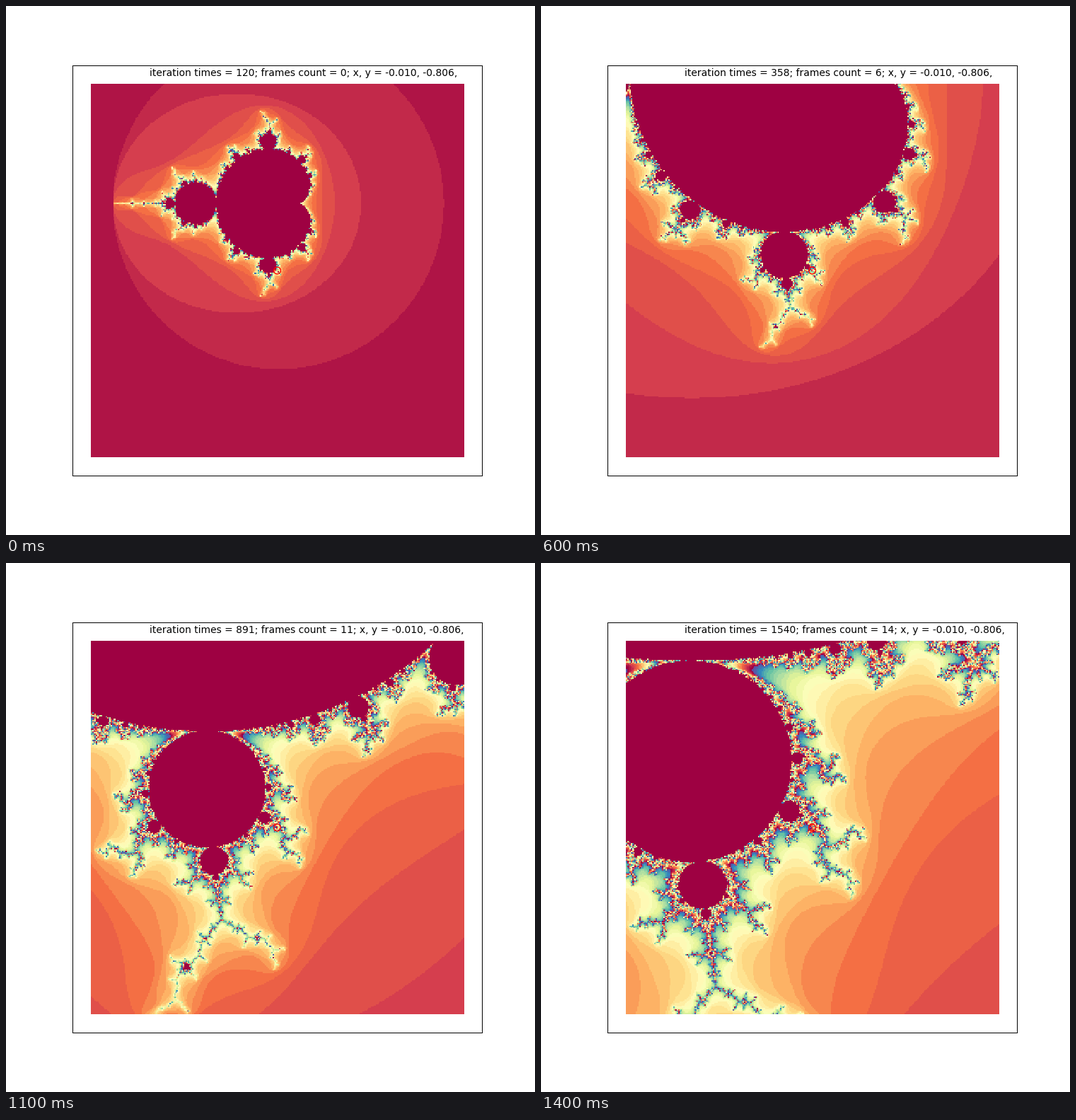
A matplotlib script that plays this animation: 748x748 px, repeating every 1500 ms.

```python
import numpy as np
import matplotlib.pyplot as plt
from matplotlib.animation import FuncAnimation

STAGE = 748
SIZE = 300            # samples per side
HALF = 2.25           # half width of the first view in the complex plane
ZOOM = 1.2
CX, CY = -0.010, -0.806
FRAMES = 15
CYCLE = 30            # colours repeat after this many iterations
CHECK = 60            # steps between tests for settled orbits


def escape_counts(c, limit):
    """Steps until |z| > 2 for each point, 0 where it never escapes."""
    counts = np.zeros(c.size, dtype=int)
    index = np.arange(c.size)
    c = c.ravel()
    z = np.zeros_like(c)
    saved = z.copy()
    for n in range(1, limit):
        z = z * z + c
        out = z.real ** 2 + z.imag ** 2 > 4
        drop = out
        if n % CHECK == 0:
            drop = out | (np.abs(z - saved) < 1e-11)
            saved = z.copy()
        if drop.any():
            counts[index[out]] = n
            keep = ~drop
            c, z, saved, index = c[keep], z[keep], saved[keep], index[keep]
            if not index.size:
                break
    return counts.reshape(SIZE, SIZE)


def iterations(n):
    return int(120 * ZOOM ** n)


def view(n):
    offset = np.linspace(-HALF, HALF, SIZE) / ZOOM ** n
    c = (CX + offset)[None, :] + 1j * (CY - offset)[:, None]
    return escape_counts(c, iterations(n)) % CYCLE


def caption(n):
    return (f"iteration times = {iterations(n)}; frames count = {n}; "
            f"x, y = {CX:.3f}, {CY:.3f},")


def pixel_axes(x, y, side):
    """Square axes with pixel coordinates measured from the stage's top left."""
    ax = fig.add_axes([x / STAGE, 1 - (y + side) / STAGE,
                       side / STAGE, side / STAGE])
    ax.set(xlim=(x, x + side), ylim=(y + side, y), xticks=[], yticks=[])
    return ax


fig = plt.figure(figsize=(STAGE / 100, STAGE / 100), dpi=100,
                 facecolor="white")
frame = pixel_axes(93.5, 84.15, 579.7)
for spine in frame.spines.values():
    spine.set_linewidth(0.72)
label = frame.text(203.2, 99.4, "", fontsize=10, family="DejaVu Sans")

plot = pixel_axes(120, 110, 528)
plot.axis("off")
image = plot.imshow(np.zeros((SIZE, SIZE)), cmap="Spectral", vmin=0,
                    vmax=CYCLE - 1, interpolation="nearest",
                    extent=(120, 648, 638, 110))
plot.scatter([383.5], [374], s=50, facecolors="none", edgecolors="red",
             linewidths=1)

views = {}


def draw(n):
    if n not in views:
        views[n] = view(n)
    image.set_data(views[n])
    label.set_text(caption(n))
    return image, label


anim = FuncAnimation(fig, draw, frames=FRAMES, interval=100, repeat=True,
                     repeat_delay=0)
plt.show()
```
